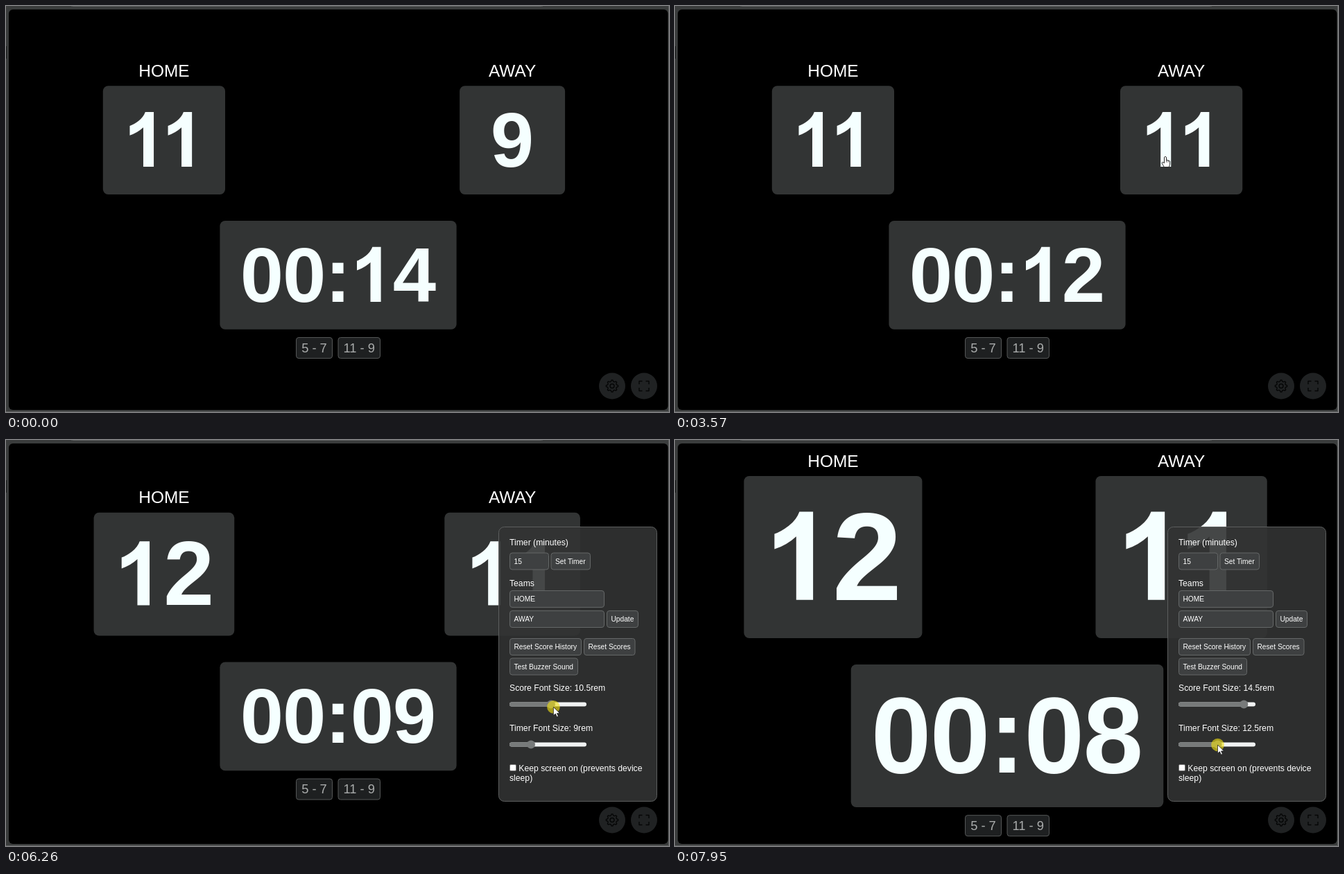
Recreate the animation shown at these times as an HTML page. Size 956 by 586 pixels, loop 8 s.

```html
<!DOCTYPE html>
<html lang="en">
<head>
<meta charset="utf-8">
<title>Scoreboard</title>
<style>
  html, body { margin: 0; width: 100%; height: 100%; overflow: hidden; background: #3a3c3c; }
  svg { display: block; width: 956px; height: 586px; font-family: "Liberation Sans", Arial, sans-serif; }
  text { white-space: pre; }
  .big { font-weight: bold; fill: #f5ffff; font-kerning: none; }
  .team { font-size: 24.4px; fill: #fff; text-anchor: middle; }
  .pill rect { fill: #1e2021; stroke: #555757; }
  .pill text { font-size: 18.3px; fill: #a9abab; text-anchor: middle; }
  .label { font-size: 12.2px; fill: #fff; }
  .ctl { fill: #3e4041; stroke: #646767; }
  .ctl-text { font-size: 10.2px; fill: #fff; }
  .icon { fill: none; stroke: #050606; stroke-width: 1.4; stroke-linejoin: round; }
</style>
</head>
<body>
<svg viewBox="0 0 956 586">
  <rect x="4" y="5" width="950.5" height="578" rx="6" fill="#000"/>
  <path d="M955.5 0V585.5H0" fill="none" stroke="#5c5e5e"/>
  <path d="M94 0Q95 .5 98 .5H770Q773 .5 774 0" fill="#2a2c2c" stroke="#5c5e5e"/>
  <rect y="58" width="1" height="18" fill="#151717"/>
  <g id="board"></g>
  <g id="buttons"></g>
  <g id="panel">
    <rect x="710.5" y="125.5" width="228" height="396" rx="8" fill="#323434" fill-opacity=".9" stroke="#5c5e5e"/>
    <g id="form"></g>
    <g id="sliders"></g>
  </g>
  <g id="pointer"></g>
</svg>
<script>
const LOOP = 8000, STEP = 111.8, REM = 12.22, BASE = 9 * REM, LINE = 1.149;
const $ = id => document.getElementById(id);

// Waypoints: [step, value...], linear in between
const POINTER = [
  [2, 823, 526], [5, 604, 411], [7, 604, 411], [12, 722, 180], [22, 722, 180],
  [23, 738, 199], [26, 738, 199], [29, 707, 217], [32, 707, 217], [35, 265, 205],
  [38, 265, 205], [39, 345, 240], [43, 873, 552], [45, 873, 552], [47, 842, 456],
  [50, 790, 363], [52, 778, 384], [54, 777, 385], [59, 808, 386], [62, 821, 388],
  [64, 799, 406], [67, 757, 440], [69, 757, 440], [71, 782.5, 440]
];
const SCORE_SIZE = [[54, 9], [59, 13], [62, 14.5]];
const TIMER_SIZE = [[69, 9], [71, 12.5]];
const PRESSES = [[20, 21], [29, 31], [36, 36], [44, 44], [54, 62], [68, 71]];

function sample(points, k) {
  const i = points.findIndex(p => p[0] > k);
  if (i === 0) return points[0].slice(1);
  if (i < 0) return points[points.length - 1].slice(1);
  const a = points[i - 1], b = points[i], f = (k - a[0]) / (b[0] - a[0]);
  return a.slice(1).map((v, n) => v + (b[n + 1] - v) * f);
}
const half = v => Math.round(v * 2) / 2;

const text = (cls, x, y, s) => `<text class="${cls}" x="${x}" y="${y}">${s}</text>`;
const rect = (x, y, w, h, rx, attrs) =>
  `<rect x="${x}" y="${y}" width="${w}" height="${h}" rx="${rx}" ${attrs}/>`;

// Digit advances in em; the pair "11" is kerned
function layout(s) {
  let w = 0;
  const xs = [...s].map((c, i) => {
    if (c === "1" && s[i - 1] === "1") w -= 0.055;
    const x = w;
    w += c === ":" ? 0.333 : 0.556;
    return x;
  });
  return { xs, w };
}

// A plain "1" without a foot
const ONE = "M806 0H525V1059Q371 915 162 846V1101Q272 1137 401 1237T578 1472H806Z";

function card(s, cx, top, size, minW = 0) {
  const { xs, w } = layout(s);
  const boxW = Math.max(minW, w * size + 60), boxH = LINE * size + 30.4;
  const left = cx - w * size / 2, base = top + 15.6 + 0.921 * size, k = size / 2048;
  const ones = xs.map((x, i) => s[i] === "1"
    ? `<path class="big" d="${ONE}" transform="translate(${left + x * size} ${base}) scale(${k} ${-k})"/>` : "");
  const chars = [...s].map(c => c === "1" ? `<tspan fill="none">1</tspan>` : c).join("");
  const at = xs.map(x => (left + (x - 0.006) * size).toFixed(2)).join(" ");
  return {
    x: cx - boxW / 2, y: top, w: boxW, h: boxH,
    svg: rect(cx - boxW / 2, top, boxW, boxH, 7.6, 'fill="#323434"') +
      `<text class="big" font-size="${size * 1.02}" x="${at}" y="${base}">${chars}</text>` + ones.join("")
  };
}

const pill = (x, y, w, s) =>
  `<g class="pill">${rect(x, y, w, 30, 3.5, "")}${text("", x + w / 2, y + 21, s)}</g>`;

const field = (x, y, w, s) =>
  rect(x + 0.5, y + 0.5, w - 1, 24, 3.5, 'class="ctl"') + text("ctl-text", x + 6.5, y + 16.2, s);

function slider(x, y, hover) {
  const tone = hover ? "#5d6060" : "#777a7a";
  return rect(726, y - 3, 111, 6, 3, 'fill="#f0f2f2"') +
    rect(726, y - 3, x - 726, 6, 3, `fill="${tone}"`) +
    `<circle cx="${x}" cy="${y}" r="6" fill="${tone}"/>`;
}

function gear(cx, cy) {
  const pts = [];
  for (let i = 0; i < 32; i++) {
    const a = (i - 0.5) * Math.PI / 16, r = i % 4 < 2 ? 8.6 : 6.6;
    pts.push((cx + r * Math.cos(a)).toFixed(1) + "," + (cy + r * Math.sin(a)).toFixed(1));
  }
  return `<polygon class="icon" points="${pts.join(" ")}"/><circle class="icon" cx="${cx}" cy="${cy}" r="3"/>`;
}

$("buttons").innerHTML =
  [874, 920].map(x => `<circle cx="${x}" cy="548.5" r="19" fill="#202223"/>`).join("") + gear(874, 548.5) +
  `<path class="icon" d="M913 546V541.5H917.5M922.5 541.5H927V546M927 551V555.5H922.5M917.5 555.5H913V551"/>`;

$("form").innerHTML =
  text("label", 726, 152, "Timer (minutes)") +
  field(726, 162.5, 57, "15") + field(785.5, 162.5, 57.5, "Set Timer") +
  text("label", 726, 210.5, "Teams") +
  field(726, 217, 137, "HOME") + field(726, 246, 137, "AWAY") + field(866, 246, 46, "Update") +
  field(726, 286, 104, "Reset Score History") + field(833, 286, 74.5, "Reset Scores") +
  field(726, 314.5, 99, "Test Buzzer Sound") +
  rect(726.5, 468.5, 9, 9, 1.5, 'fill="#fff" stroke="#767676"') +
  text("label", 739.3, 478, "Keep screen on (prevents device") +
  text("label", 726, 492.3, "sleep)");

const HAND = `<path d="M-1.5 9.6V1.3Q0 -.7 1.5 1.3V5.4L4 5.9 6.6 7V11.2L5.3 15.6H-1.6L-5 9.7Q-4.6 8 -3 8.7Z"
  fill="#fff" stroke="#111" stroke-width=".9" stroke-linejoin="round"/>
  <path d="M1.5 5.4V8.6M4 5.9V8.8" stroke="#111" stroke-width=".7"/>`;
const ARROW = `<path d="M0 0V12.4L2.9 9.7 4.9 14.2 7 13.3 5 9H9Z" fill="#fff" stroke="#111" stroke-width=".7"/>`;

function draw(k) {
  const score = half(sample(SCORE_SIZE, k)[0]), timer = half(sample(TIMER_SIZE, k)[0]);
  const secs = 14 - Math.max(0, Math.floor(k / 9) - 1);
  const grow1 = LINE * (score * REM - BASE) / 2, grow2 = LINE * (timer * REM - BASE) / 2;
  const top = 115.2 - grow1 - grow2, bottom = 478.5 + grow1 + grow2;
  const open = k >= 45;

  const cards = [
    card(k < 37 ? "11" : "12", 227.9, top, score * REM, 152),
    card(k < 22 ? "9" : k < 32 ? "10" : "11", 730.1, top, score * REM, 152),
    card("00:" + String(secs).padStart(2, "0"), 479, 310 + grow1 - grow2, timer * REM)
  ];
  $("board").innerHTML = text("team", 227.9, top - 13.4, "HOME") + text("team", 730.1, top - 13.4, "AWAY") +
    cards.map(c => c.svg).join("") +
    pill(418.5, bottom, 52, "5 - 7") + pill(479, bottom, 60.5, "11 - 9");

  $("panel").style.display = open ? "" : "none";
  const [x, y] = sample(POINTER, k);
  $("sliders").innerHTML =
    text("label", 726, 362, `Score Font Size: ${score}rem`) +
    slider(773 + 8.6 * (score - 9), 381.5, k > 50 && k < 54) +
    text("label", 726, 420, `Timer Font Size: ${timer}rem`) +
    slider(757 + 7.3 * (timer - 9), 439.5, k === 67);

  const inside = b => x > b.x && x < b.x + b.w && y > b.y && y < b.y + b.h;
  const hand = !open && cards.concat({ x: 855, y: 530, w: 38, h: 38 }).some(inside);
  const pressed = PRESSES.some(([a, b]) => k >= a && k <= b);
  $("pointer").innerHTML = k < 2 ? "" : `<g transform="translate(${x} ${y})">` +
    (pressed ? '<circle r="9.3" fill="#f0e114" fill-opacity=".62"/>' : "") +
    (hand ? HAND : ARROW) + "</g>";
}

const start = performance.now();
let last = -1;
function tick() {
  const t = (performance.now() - start) % LOOP;
  const k = Math.floor((t + 10) / STEP);
  if (k !== last) draw(last = k);
  requestAnimationFrame(tick);
}
tick();
</script>
</body>
</html>
```
